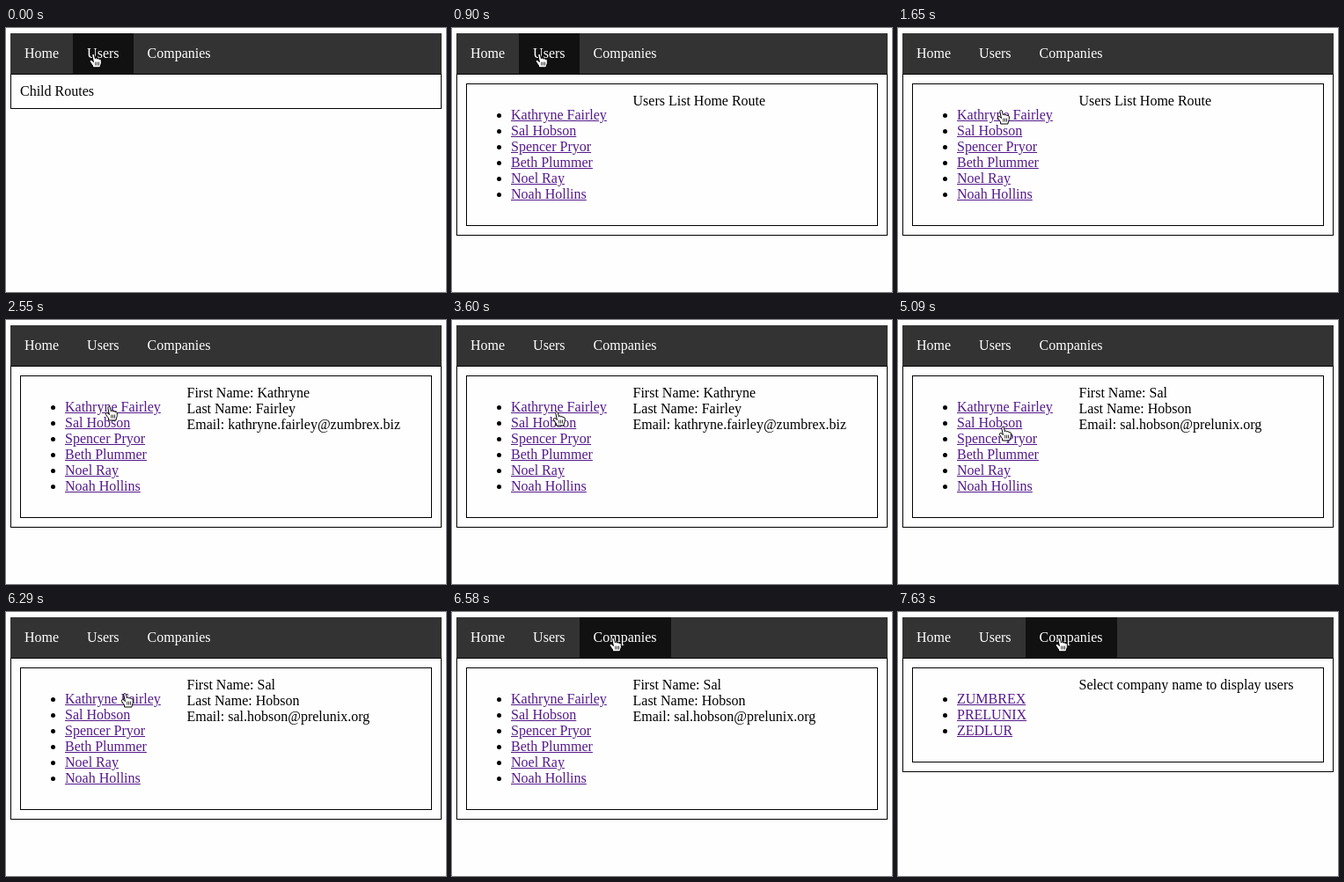
These frames come from a looping animation (500x300 px, 8 s). An HTML page:

```html
<!DOCTYPE html>
<html lang="en">
<head>
<meta charset="utf-8">
<title>Child routes</title>
<style>
  html, body { margin: 0; width: 100%; height: 100%; overflow: hidden; }
  body { position: relative; background: #fefefe; font: 16px/18px "Liberation Serif", "Times New Roman", serif; color: #000; }
  nav { position: absolute; left: 5px; top: 6px; width: 490px; height: 46px; background: #333; display: flex; }
  nav span { padding: 14px 16px; color: #fff; }
  nav .hover { background: #111; }
  #page { position: absolute; left: 5px; top: 52px; width: 490px; }
  #page, .panel { box-sizing: border-box; border: 1px solid #000; padding: 10px; }
  .panel { position: relative; }
  .info { position: absolute; left: 188.5px; top: 10px; white-space: pre; }
  ul { margin: 16px 0; padding-left: 40px; }
  .panel { display: flow-root; }
  li span { color: #551a8b; text-decoration: underline; }
  li .active { color: #f00; }
  #hand { position: absolute; left: 0; top: 0; }
</style>
</head>
<body>
<nav><span>Home</span><span>Users</span><span>Companies</span></nav>
<div id="page"></div>
<svg id="hand" width="16" height="18" stroke="#000" stroke-linecap="round" stroke-linejoin="round">
  <path fill="#fff" d="M4.6 16.6V15C3.5 13 1.4 10.8 1.3 9.8C1.3 8.3 3 8 4.1 9.2L5.4 10.6L3.9 3.4C3.6 1.3 5.8.8 6.4 2.6L7.4 6.8C7.6 5.6 9.6 5.6 9.8 7.2C10.2 6.2 12 6.4 12.1 7.8C12.8 7 14.3 7.4 14.3 9V11.5C14.2 13.3 13.2 14 13 16.6Z"/>
  <path fill="none" stroke-width=".8" d="M7.7 11v3.2M9.6 11v3.2M11.5 11v3.2"/>
</svg>
<script>
const LOOP = 8000;
const users = ["Kathryne Fairley", "Sal Hobson", "Spencer Pryor", "Beth Plummer", "Noel Ray", "Noah Hollins"];
const companies = ["ZUMBREX", "PRELUNIX", "ZEDLUR"];

const panel = (names, info, active) =>
  `<div class="panel"><ul>${names.map((name, i) =>
    `<li><span class="${i === active ? "active" : ""}">${name}</span></li>`).join("")}</ul><div class="info">${info}</div></div>`;

const profile = (name, domain) => {
  const [first, last] = name.split(" ");
  return `First Name: ${first}\nLast Name: ${last}\nEmail: ${first.toLowerCase()}.${last.toLowerCase()}@${domain}`;
};

const firstUser = profile(users[0], "zumbrex.biz");
const secondUser = profile(users[1], "prelunix.org");

// Each track: [start time, value...]
const views = [
  [0, "Child Routes"],
  [900, panel(users, "Users List Home Route")],
  [2550, panel(users, firstUser)],
  [4950, panel(users, firstUser, 1)],
  [5090, panel(users, secondUser)],
  [7630, panel(companies, "Select company name to display users")]
];
const hovers = [[0, 1], [1500, -1], [6430, 2]];
const moves = [
  [0, 94, 28], [1500, 112, 82], [1650, 112, 92], [1800, 112, 97],
  [3600, 114, 103], [3750, 114, 110], [3900, 114, 118], [4050, 114, 120],
  [6290, 130, 91], [6430, 172, 37], [6580, 178, 28]
];

const page = document.getElementById("page");
const hand = document.getElementById("hand");
const tabs = document.querySelectorAll("nav span");
const at = (track, t) => track.findLast(step => step[0] <= t);
let shown;

function draw(now) {
  const t = now % LOOP;
  const view = at(views, t);
  if (view !== shown) {
    page.innerHTML = view[1];
    shown = view;
  }
  const hover = at(hovers, t)[1];
  tabs.forEach((tab, i) => tab.classList.toggle("hover", i === hover));
  const [, x, y] = at(moves, t);
  hand.style.transform = `translate(${x}px, ${y}px)`;
}

const start = performance.now();
function tick() {
  draw(performance.now() - start);
  requestAnimationFrame(tick);
}
tick();
</script>
</body>
</html>
```
